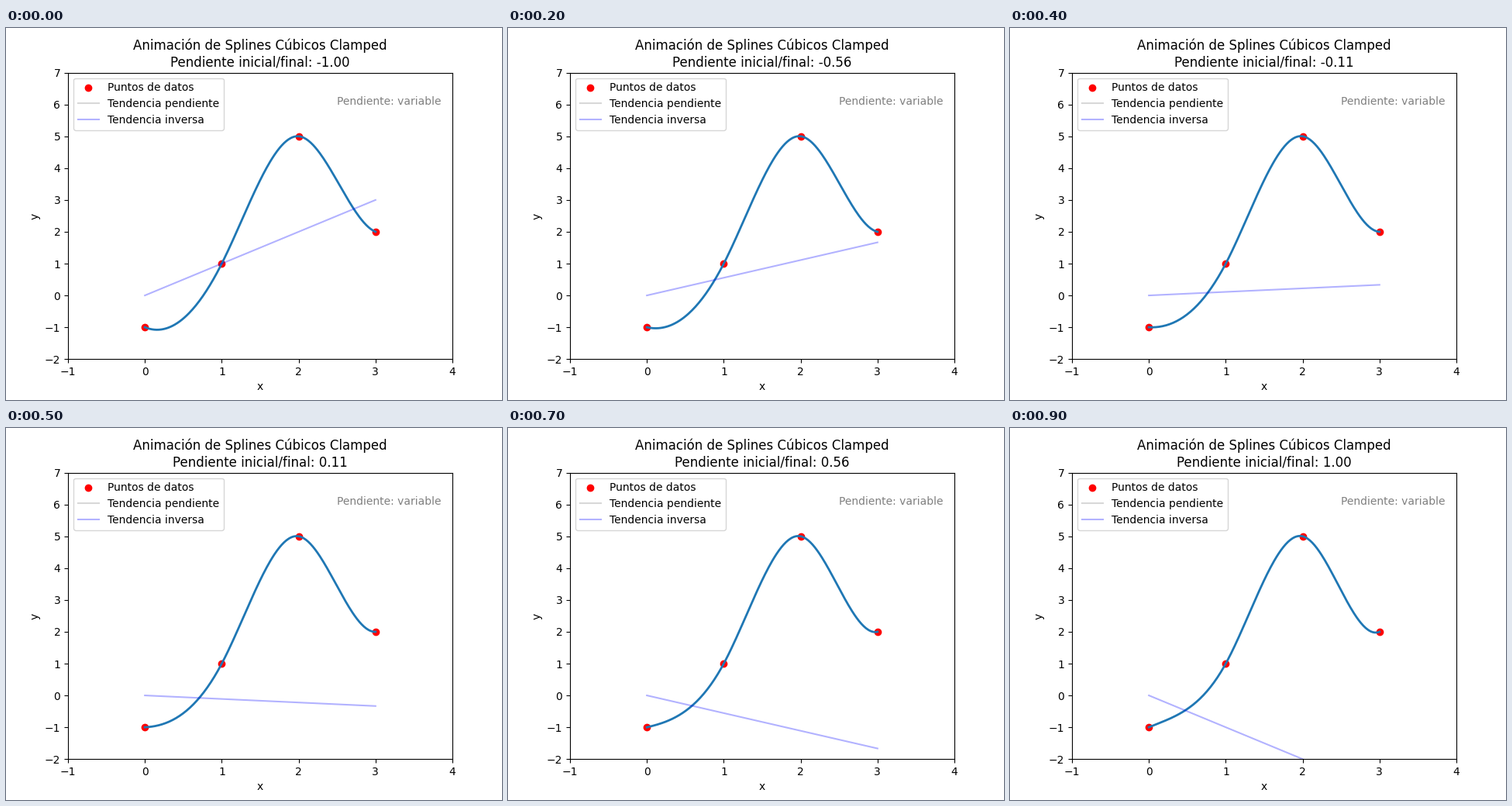
Write a matplotlib script that moves like this. It is 640 px wide and 480 px high and loops after 1000 ms.

```python
import numpy as np
import matplotlib.pyplot as plt
from matplotlib.animation import FuncAnimation

FRAMES = 10
INTERVAL = 100

knots_x = np.array([0, 1, 2, 3])
knots_y = np.array([-1, 1, 5, 2])
slopes = np.linspace(-1, 1, FRAMES)
xs = np.linspace(0, 3, 200)


def clamped_spline(x, end_slope):
    """Cubic spline through the unit-spaced knots, same slope at both ends."""
    system = np.eye(4)
    system[1, :3] = system[2, 1:] = 1, 4, 1
    rhs = np.full(4, float(end_slope))
    rhs[1:3] = 3 * (knots_y[2:] - knots_y[:-2])
    m = np.linalg.solve(system, rhs)

    i = np.minimum(x.astype(int), 2)
    t = x - knots_x[i]
    rise = knots_y[i + 1] - knots_y[i]
    quad = 3 * rise - 2 * m[i] - m[i + 1]
    cubic = m[i] + m[i + 1] - 2 * rise
    return knots_y[i] + t * (m[i] + t * (quad + t * cubic))


fig, ax = plt.subplots(figsize=(6.4, 4.8), dpi=100)
ax.set_xlim(-1, 4)
ax.set_ylim(-2, 7)
ax.set_xlabel("x")
ax.set_ylabel("y")

ax.scatter(knots_x, knots_y, color="red", label="Puntos de datos")
curve, = ax.plot([], [], lw=2)
ax.plot([], [], color="gray", alpha=0.3, label="Tendencia pendiente")
inverse, = ax.plot([], [], color="blue", alpha=0.3, label="Tendencia inversa")
ax.text(2.5, 6, "Pendiente: variable", fontsize=10, color="gray")
ax.legend(loc="upper left")


def update(frame):
    slope = slopes[frame]
    curve.set_data(xs, clamped_spline(xs, slope))
    inverse.set_data(xs, -slope * xs)
    ax.set_title("Animación de Splines Cúbicos Clamped\n"
                 f"Pendiente inicial/final: {slope:.2f}")
    return curve, inverse


anim = FuncAnimation(fig, update, frames=FRAMES, interval=INTERVAL,
                     repeat=True, repeat_delay=0)
plt.show()
```
